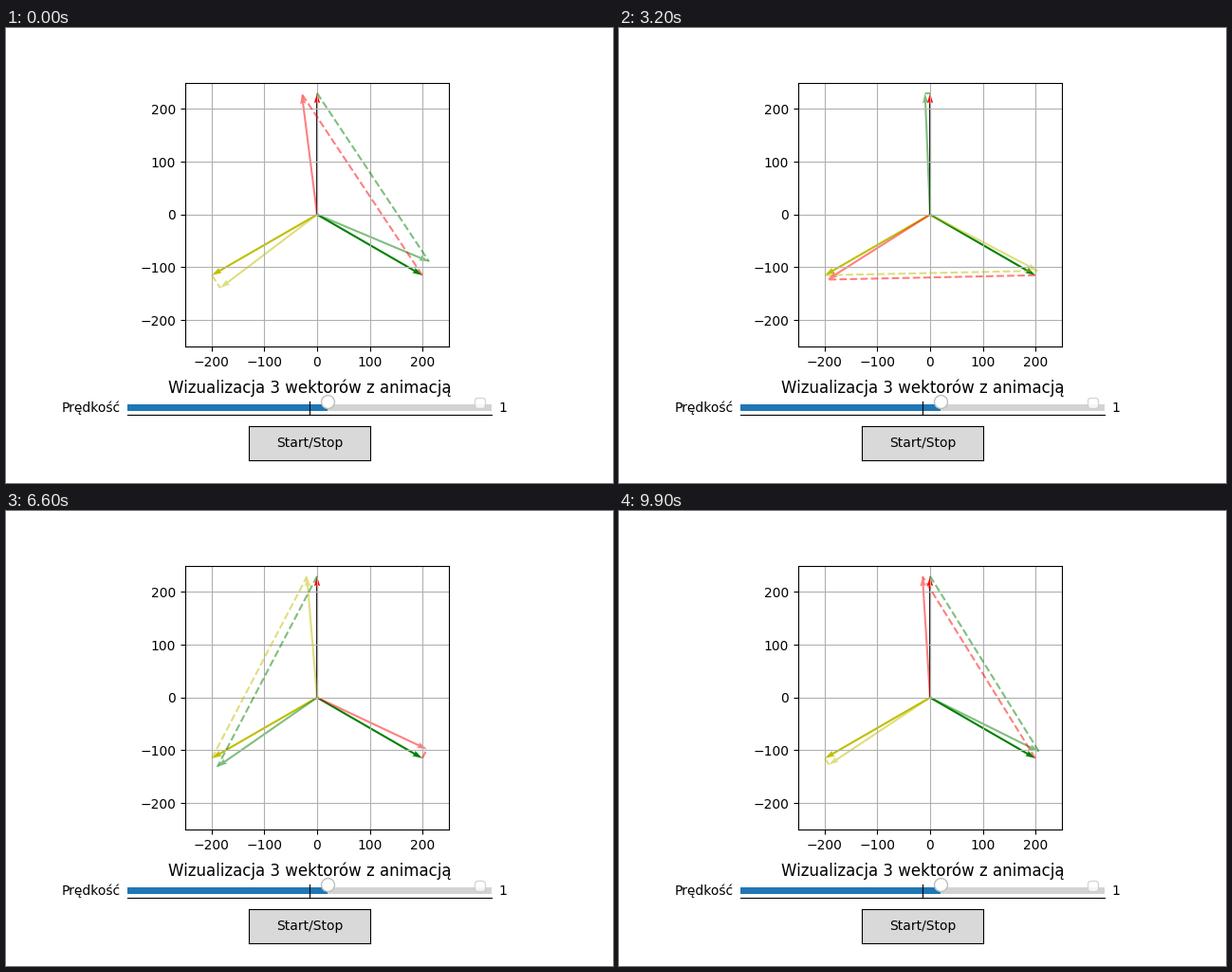
A matplotlib script that plays this animation: 640 px wide and 480 px high, repeating every 10 s.

```python
import numpy as np
import matplotlib.pyplot as plt
from matplotlib.animation import FuncAnimation
from matplotlib.patches import Rectangle

FRAMES = 100
R = 230
COLORS = ["r", "g", "y"]
BASE = np.radians([90, 330, 210])
STEP = 2 * np.pi / FRAMES

plt.rcParams["font.family"] = "DejaVu Sans"
fig = plt.figure(figsize=(6.4, 4.8), dpi=100)


def tips(angles):
    return R * np.column_stack([np.cos(angles), np.sin(angles)])


def arrow(ax, start, vec, color, alpha=1.0):
    return ax.quiver(*start, *vec, color=color, alpha=alpha,
                     angles="xy", scale_units="xy", scale=1)


def make_plot():
    ax = fig.add_axes([0.295, 0.3, 0.435, 0.58])
    ax.set(xlim=(-250, 250), ylim=(-250, 250),
           xticks=range(-200, 201, 100), yticks=range(-200, 201, 100))
    ax.grid(True)
    return ax


def make_slider(value=1, low=-10, high=10):
    ax = fig.add_axes([0.2, 0.15, 0.6, 0.03])
    ax.patch.set_visible(False)
    ax.set(xlim=(low, high), ylim=(0, 0.525), xticks=[], yticks=[])
    ax.set_title("Wizualizacja 3 wektorów z animacją")
    for side in ("top", "right"):
        ax.spines[side].set_visible(False)
    ax.spines["left"].set_position("zero")

    part = (value - low) / (high - low)
    for width, color in ((1, "lightgrey"), (part, "tab:blue")):
        ax.add_patch(Rectangle((0, 0.25), width, 0.5, lw=0, color=color,
                               transform=ax.transAxes))
    ax.plot([value], [0.5], "o", ms=10, mfc="white", mec="0.75",
            clip_on=False)
    ax.text(-0.02, 0.5, "Prędkość", transform=ax.transAxes,
            ha="right", va="center")
    ax.text(1.02, 0.5, str(value), transform=ax.transAxes,
            ha="left", va="center")
    ax.legend([], [], loc="lower right")


def make_button():
    ax = fig.add_axes([0.4, 0.05, 0.2, 0.075], facecolor="0.85")
    ax.set(xticks=[], yticks=[])
    ax.text(0.5, 0.5, "Start/Stop", transform=ax.transAxes,
            ha="center", va="center")


ax = make_plot()
make_slider()
make_button()

fixed = tips(BASE)
# The upright vector has a dark shaft and a red head.
ax.plot([0, 0], [0, R - 16], color="0.1", lw=1.5, zorder=1,
        solid_capstyle="butt")
arrow(ax, (0, R - 20), (0, 20), "r")
for tip, color in zip(fixed[1:], COLORS[1:]):
    arrow(ax, (0, 0), tip, color)

spinning = [arrow(ax, (0, 0), tip, c, 0.5) for tip, c in zip(fixed, COLORS)]
links = [ax.plot([], [], "--", color=c, alpha=0.5)[0] for c in COLORS]
# Each link joins a spinning tip to this fixed tip.
anchors = fixed[[1, 0, 2]]


def update(i):
    moved = tips(BASE + STEP * (i + 2))
    for quiver, link, tip, anchor in zip(spinning, links, moved, anchors):
        quiver.set_UVC(*tip)
        link.set_data([anchor[0], tip[0]], [anchor[1], tip[1]])
    return spinning + links


anim = FuncAnimation(fig, update, frames=FRAMES, interval=100,
                     repeat=True, repeat_delay=0, blit=False)
plt.show()
```
